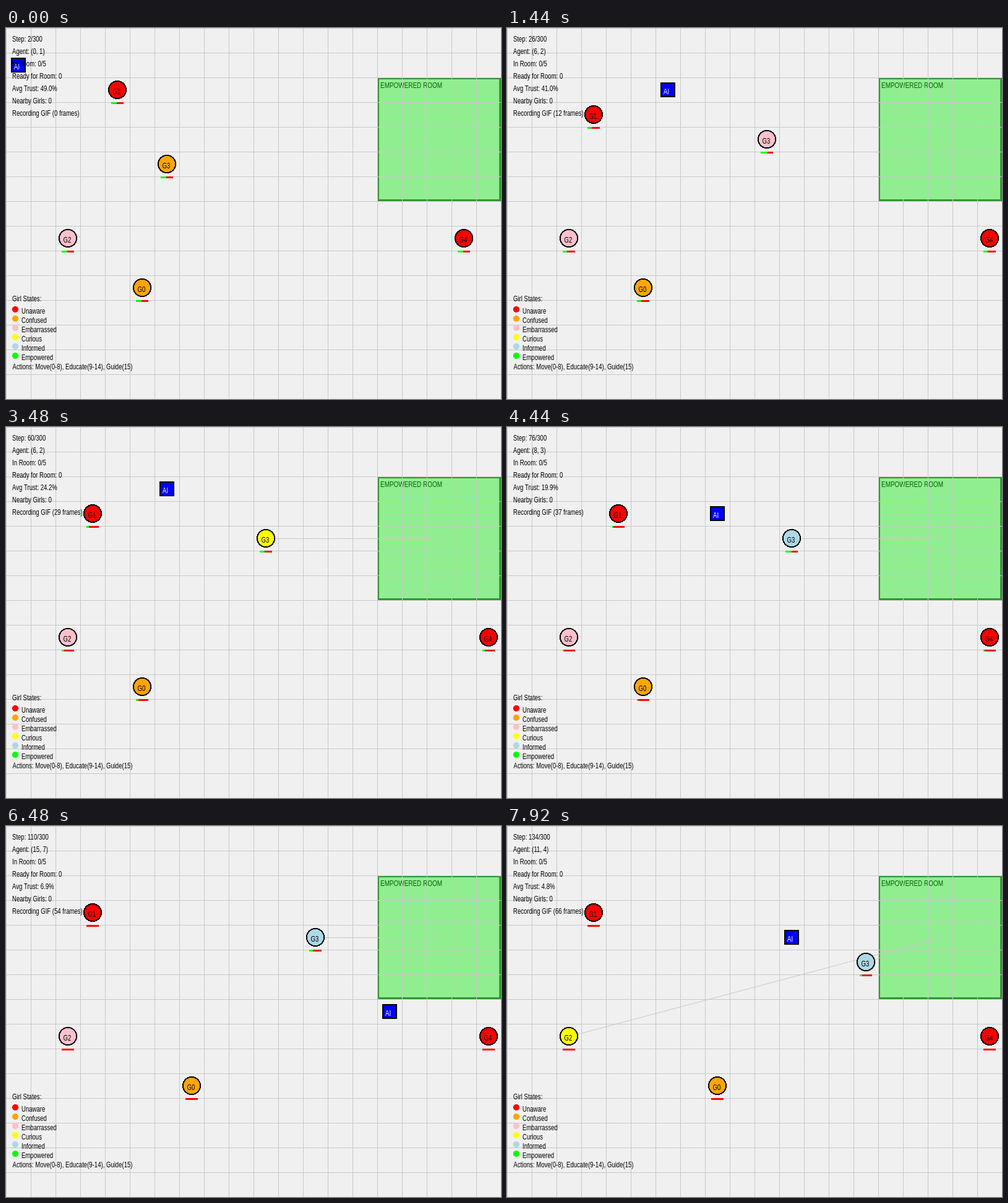
Animation of 800 by 600 pixels, one loop 8000 ms. Source, as an HTML page with a canvas:

```html
<!DOCTYPE html>
<html lang="en">
<head>
<meta charset="utf-8">
<title>Grid agent simulation</title>
<style>
html, body { margin: 0; width: 100%; height: 100%; overflow: hidden; background: #f0f0f0; }
canvas { display: block; }
</style>
</head>
<body>
<canvas id="stage" width="800" height="600"></canvas>
<script>
const ctx = document.getElementById('stage').getContext('2d');
const LOOP = 8000, TICK = 120, CELL = 40;
const CONDENSED = 0.765; // narrow sans look
const GRID = '#c8c8c8';

const STATES = [
  ['Unaware', '#ff0000'], ['Confused', '#ffa500'], ['Embarrassed', '#ffc0cb'],
  ['Curious', '#ffff00'], ['Informed', '#add8e6'], ['Empowered', '#00ff00']
];
const [UNAWARE, CONFUSED, EMBARRASSED, CURIOUS, INFORMED] = STATES.keys();

// Where the agent turns: [tick, column, row]
const TURNS = [
  [0, 0, 1], [3, 2, 0], [12, 6, 2], [17, 7, 0], [19, 7, 1],
  [29, 6, 2], [44, 10, 4], [54, 15, 7], [66, 11, 4]
];

const after = (tick, t) => tick >= t ? 1 : 0;
const ramp = (tick, t0, t1) => Math.min(1, Math.max(0, (tick - t0) / (t1 - t0)));
const center = cell => cell * CELL + CELL / 2;

function agentCell(tick) {
  const i = Math.max(1, TURNS.findIndex(turn => turn[0] >= tick));
  const [t0, x0, y0] = TURNS[i - 1], [t1, x1, y1] = TURNS[i];
  const u = ramp(tick, t0, t1);
  return [Math.round(x0 + (x1 - x0) * u), Math.round(y0 + (y1 - y0) * u)];
}

// Trust decays steadily; lessons add a bonus, walks are ramps between cells.
function girlsAt(tick) {
  const on = t => after(tick, t), walk = (t0, t1) => ramp(tick, t0, t1);
  const girl = (x, y, state, bonus = 0) => ({
    x: Math.round(x), y: Math.round(y), state,
    trust: Math.max(0, 49 - tick + bonus)
  });
  return [
    girl(5 + 2 * walk(46, 52) + walk(57, 61), 10, CONFUSED),
    girl(4 - on(6) + on(37) - on(49), 2 + on(6), UNAWARE),
    girl(2, 8, EMBARRASSED + on(62), 18.5 * on(62)),
    girl(6 + 4 * walk(5, 10) + 2 * walk(35, 40) + 2 * walk(58, 63), 5 - on(8) + on(62),
      CONFUSED + on(5) + on(24) + on(37), 20 * on(5) + on(16) + 18.5 * on(37)),
    girl(18 + on(4), 8, UNAWARE)
  ];
}

function rect(x, y, w, h, color) {
  ctx.fillStyle = color;
  ctx.fillRect(x, y, w, h);
}

// Hard-edged disc built from pixel rows
function disc(x, y, r, color) {
  for (let row = -r; row < r; row++) {
    const half = Math.round(Math.sqrt(r * r - (row + 0.5) ** 2));
    rect(x - half, y + row, half * 2, 1, color);
  }
}

function text(str, x, y, color = '#000', size = 12.5) {
  ctx.save();
  ctx.translate(x, y);
  ctx.scale(CONDENSED, 1);
  ctx.font = `${size}px "Liberation Sans", Arial, sans-serif`;
  ctx.fillStyle = color;
  ctx.fillText(str, 0, 0);
  ctx.restore();
}

function drawBoard() {
  rect(0, 0, 800, 600, '#f0f0f0');
  rect(600, 80, 200, 200, '#329632');
  rect(603, 83, 194, 194, '#90ee90');
  text('EMPOWERED ROOM', 605, 97, '#006400', 13);
  for (let x = 0; x < 800; x += CELL) rect(x, 0, 1, 600, GRID);
  for (let y = 0; y < 600; y += CELL) rect(0, y, 800, 1, GRID);
}

function drawGuide({ x, y, state }) {
  if (state !== CURIOUS && state !== INFORMED) return;
  ctx.strokeStyle = GRID;
  ctx.lineCap = 'square';
  ctx.beginPath();
  ctx.moveTo(center(x) + 0.5, center(y) + 0.5);
  ctx.lineTo(700.5, 180.5);
  ctx.stroke();
}

function drawGirl({ x, y, state, trust }, i) {
  const cx = center(x), cy = center(y);
  disc(cx, cy, 15, '#000');
  disc(cx, cy, 13, STATES[state][1]);
  text('G' + i, cx - 7.5, cy + 7);
  rect(cx - 10, cy + 20, 20, 3, '#ff0000');
  rect(cx - 10, cy + 20, Math.floor(trust / 5), 3, '#00ff00');
}

function drawAgent([x, y]) {
  const cx = center(x), cy = center(y);
  rect(cx - 12, cy - 12, 24, 24, '#000');
  rect(cx - 10, cy - 10, 20, 20, '#0000ff');
  text('AI', cx - 7, cy + 7, '#fff');
}

function drawLegend() {
  text('Girl States:', 10, 442);
  STATES.forEach(([name, color], i) => {
    disc(15, 455 + i * 15, 5, color);
    text(name, 25, 462 + i * 15);
  });
  text('Actions: Move(0-8), Educate(9-14), Guide(15)', 10.5, 552);
}

function draw(tick) {
  const agent = agentCell(tick);
  const girls = girlsAt(tick);
  const average = girls.reduce((sum, g) => sum + g.trust, 0) / girls.length;
  const nearby = girls.filter(g =>
    Math.max(Math.abs(g.x - agent[0]), Math.abs(g.y - agent[1])) <= 1).length;

  drawBoard();
  girls.forEach(drawGuide);
  girls.forEach(drawGirl);
  drawAgent(agent);
  [
    `Step: ${2 + tick * 2}/300`,
    `Agent: (${agent.join(', ')})`,
    'In Room: 0/5',
    'Ready for Room: 0',
    `Avg Trust: ${average.toFixed(1)}%`,
    `Nearby Girls: ${nearby}`,
    `Recording GIF (${tick} frames)`
  ].forEach((line, i) => text(line, 10, 22 + i * 20));
  drawLegend();
}

const start = performance.now();
function play() {
  draw(Math.floor((performance.now() - start) % LOOP / TICK));
  requestAnimationFrame(play);
}
play();
</script>
</body>
</html>
```
